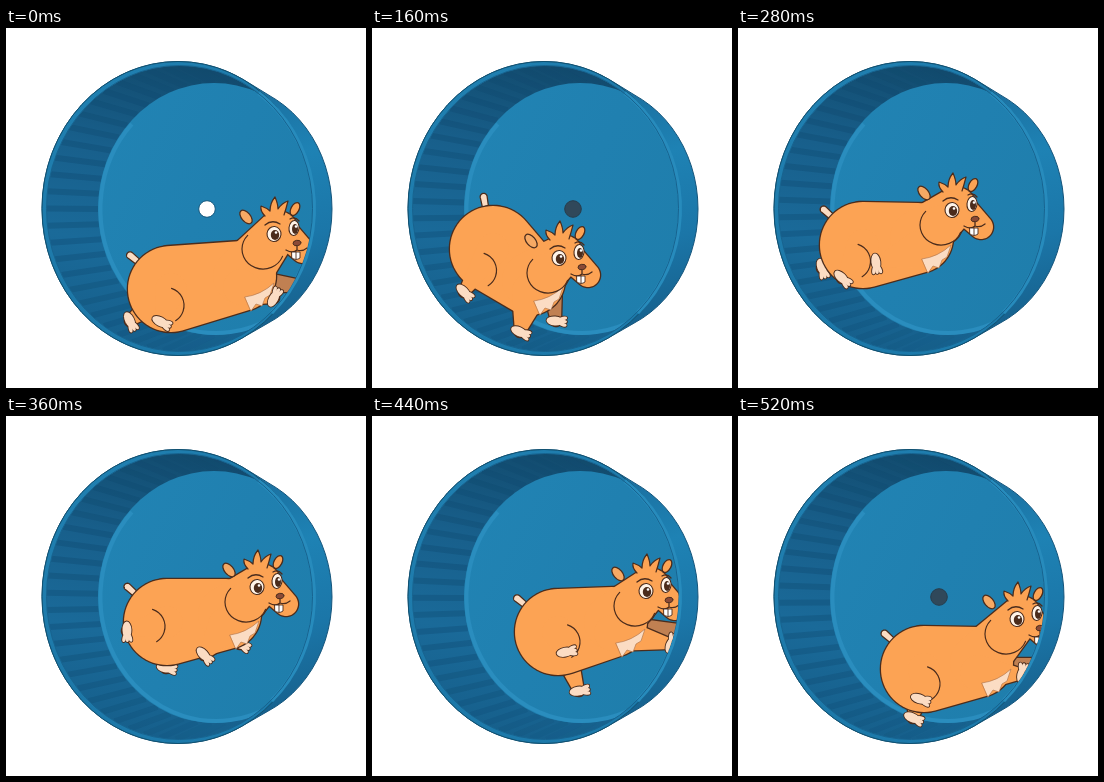
Write an HTML page with a canvas that moves like this. It is 360 px wide and 360 px high and loops after 560 ms.

```html
<!DOCTYPE html>
<html lang="en">
<head>
<meta charset="utf-8">
<title>Hamster wheel</title>
<style>
html, body { margin: 0; width: 100%; height: 100%; overflow: hidden; background: #fff; }
canvas { display: block; width: 360px; height: 360px; }
</style>
</head>
<body>
<canvas id="stage" width="360" height="360"></canvas>
<script>
const ctx = document.getElementById('stage').getContext('2d');
const STEP = 40, STEPS = 14, TAU = Math.PI * 2;
const FUR = '#fca354', CREAM = '#fbdcc3', INK = '#4b2c1c', SHADE = '#c08052';
const HIP_R = 43, CHEST_R = 35;

// Joints of the gallop; all other parts hang on these.
const gait = [
  { at: 0, hip: [165, 261], chest: [235, 248], head: [278, 203], fore: [268, 270], hind: [155, 294], hindFar: [124, 293] },
  { at: 2, hip: [140, 250], chest: [195, 256], head: [238, 218], fore: [200, 311], hind: [105, 280], hindFar: [132, 262] },
  { at: 4, hip: [121, 221], chest: [158, 252], head: [197, 227], fore: [148, 304], hind: [92, 264], hindFar: [108, 250] },
  { at: 7, hip: [125, 217], chest: [180, 210], head: [224, 179], fore: [138, 235], hind: [104, 250], hindFar: [84, 240] },
  { at: 9, hip: [161, 206], chest: [220, 198], head: [261, 168], fore: [198, 239], hind: [121, 215], hindFar: [160, 252] },
  { at: 11, hip: [186, 216], chest: [240, 206], head: [284, 172], fore: [299, 228], hind: [194, 236], hindFar: [207, 275] },
  { at: 13, hip: [186, 253], chest: [240, 246], head: [289, 200], fore: [284, 258], hind: [182, 283], hindFar: [175, 302] }
];

function poseAt(step) {
  const i = gait.findLastIndex(p => p.at <= step);
  const a = gait[i], b = gait[(i + 1) % gait.length];
  const u = (step - a.at) / ((b.at || STEPS) - a.at), pose = {};
  for (const k in a) if (k !== 'at') pose[k] = a[k].map((v, j) => v + (b[k][j] - v) * u);
  return pose;
}

const add = ([x, y], dx, dy) => [x + dx, y + dy];
const heading = (a, b) => Math.atan2(b[1] - a[1], b[0] - a[0]);

function oval(x, y, rx, ry = rx, turn = 0, from = 0, to = TAU) {
  const path = new Path2D();
  path.ellipse(x, y, rx, ry, turn, from, to);
  return path;
}

// Convex outline around ellipses given as [x, y, rx, ry].
function hull(...ovals) {
  const pts = ovals.flatMap(([x, y, rx, ry = rx]) => Array.from({ length: 72 }, (_, i) =>
    [x + rx * Math.cos(i * TAU / 72), y + ry * Math.sin(i * TAU / 72)]));
  pts.sort((a, b) => a[0] - b[0] || a[1] - b[1]);
  const side = list => {
    const out = [];
    for (const p of list) {
      for (let n = out.length; n > 1; n--) {
        const a = out[n - 2], b = out[n - 1];
        if ((b[0] - a[0]) * (p[1] - a[1]) - (b[1] - a[1]) * (p[0] - a[0]) > 0) break;
        out.pop();
      }
      out.push(p);
    }
    return out;
  };
  const path = new Path2D();
  for (const p of [...side(pts), ...side(pts.reverse())]) path.lineTo(...p);
  path.closePath();
  return path;
}

function paint(path, fill, line, width = 1.3) {
  if (fill) { ctx.fillStyle = fill; ctx.fill(path); }
  if (line) { ctx.strokeStyle = line; ctx.lineWidth = width; ctx.stroke(path); }
}

// Several shapes with one common outline.
function merge(paths, fill) {
  for (const p of paths) paint(p, null, INK, 2.6);
  for (const p of paths) paint(p, fill);
}

function place([x, y], turn, drawing) {
  ctx.save();
  ctx.translate(x, y);
  ctx.rotate(turn);
  drawing();
  ctx.restore();
}

function gradient(x0, y0, x1, y1, ...colors) {
  const g = ctx.createLinearGradient(x0, y0, x1, y1);
  colors.forEach((c, i) => g.addColorStop(i / (colors.length - 1), c));
  return g;
}

const front = [172, 180.5, 136, 147], back = [215, 181, 111, 126], floor = [208, 181, 116, 126];
const shell = hull(front, back), rim = oval(...front), plate = oval(...floor);
const lip = [173.5, 180.5, 133, 143], mouth = oval(...lip);

function wheel(step) {
  paint(shell, gradient(250, 50, 320, 290, '#1a6c9c', '#1e82b4', '#1b76a8', '#165f8b'), '#14547b', 1);
  paint(rim, gradient(60, 60, 260, 310, '#2080b1', '#1d78a8', '#1c7aab'), '#11506f', 1);
  ctx.save();
  ctx.clip(mouth);
  paint(mouth, gradient(190, 40, 130, 320, '#124b6e', '#185f8b', '#1a6a99', '#165f8b'));
  ctx.lineWidth = 6;
  for (let i = 0; i < 52; i++) {
    const a = (i + step * 5 / STEPS) * TAU / 52, c = Math.cos(a), s = Math.sin(a);
    ctx.strokeStyle = `rgba(10,62,98,${Math.max(0, 0.06 - c * 0.2)})`;
    ctx.beginPath();
    ctx.moveTo(lip[0] + lip[2] * c, lip[1] + lip[3] * s);
    ctx.lineTo(floor[0] + floor[2] * c, floor[1] + floor[3] * s);
    ctx.stroke();
  }
  paint(plate, gradient(95, 120, 305, 230, '#2183b3', '#2080b0', '#1f7eac'));
  paint(oval(210, 181, 115.5, 124, 0, TAU * 0.17, TAU * 0.62), null, '#2a8dbe', 4);
  ctx.restore();
  paint(oval(...lip.slice(0, 2), 134.5, 143, 0, -TAU * 0.15, TAU * 0.13), null, '#278bbc', 4);
  paint(mouth, null, '#17638f', 1);
  paint(oval(201, 181, 8.3), step ? '#30485a' : '#fff', step ? '#273c4b' : '#14567c', 1);
}

function paw(root, at) {
  place(at, heading(root, at) - TAU * 0.22, () => {
    const toes = [-3, 0, 3].map(y => oval(7, y, 4, 1.8, y * 0.08));
    const shapes = [oval(-1, 0, 8.5, 4.5), ...toes];
    for (const s of shapes) paint(s, null, INK, 1.8);
    for (const s of shapes) paint(s, CREAM);
  });
}

const limb = (root, at, thick) => hull([...root, thick], [...at, 5]);

function tail({ hip, chest }) {
  place(hip, heading(hip, chest) * 0.8 - TAU * 0.367, () =>
    paint(hull([41, 0, 3], [53, 0, 3.5]), CREAM, INK));
}

function face() {
  paint(oval(-21, 18, 21, 20, 0, TAU * 0.06, TAU * 0.62), null, INK, 1.2);
  paint(oval(-38, -14, 4.5, 8, -0.7), '#f6a964', INK);
  paint(new Path2D('M-19-15Q-24-20-23-25Q-17-23-14-20Q-14-28-9-34Q-6-27-6-22Q-2-28 4-30Q2-22 0-16'), FUR, INK, 1.2);
  for (const side of [-1, 1]) {
    const x = side * 10, y = -side * 3, rx = 6 - side;
    paint(oval(x, y, rx, 7.5, 0.1), '#fff4e9', INK, 1.1);
    paint(oval(x + 1, y + 1, rx * 0.6, 5), INK);
    paint(oval(x + 2, y - 1.5, 1.3), '#fff');
  }
  paint(new Path2D('M-19-6Q-12-12-4-7M6-12Q11-15 15-10M13 14V19M2 19Q9 23 13 19Q18 21 23 17'), null, INK, 1.3);
  paint(new Path2D('M8 21h8v6q-4 3-8 0zM12 21v7'), '#fff', INK, 0.9);
  paint(oval(13, 12, 4, 2.7, -0.2), '#8a4a36', INK, 1);
}

function hamster(p) {
  const { hip, chest, head, fore, hind, hindFar } = p;
  const foreFar = add(fore, 36, -11), skull = [...add(head, -6, 0), 20];
  const arm = add(chest, 0, 11), armFar = add(chest, 22, 6);
  ctx.save();
  ctx.clip(mouth);
  ctx.lineJoin = ctx.lineCap = 'round';
  tail(p);
  merge([limb(armFar, foreFar, 10)], SHADE);
  paw(armFar, foreFar);
  merge([limb(hip, hindFar, 16)], FUR);
  paw(hip, hindFar);
  place(add(head, 11, -22), 0.5, () => paint(oval(0, 0, 4, 7), FUR, INK));
  merge([
    hull([...hip, HIP_R], [...chest, CHEST_R]),
    hull([...chest, 28], skull),
    limb(arm, fore, 18),
    limb(hip, hind, 16),
    oval(...add(head, -21, 18), 21, 20),
    hull([...add(head, 1, 2), 14], [...add(head, 19, 20), 12])
  ], FUR);
  place(chest, 0, () =>
    paint(new Path2D('M4 21Q20 19 33 7L29 19L24 22L21 30L15 28L10 35Z'), CREAM, '#a96f48', 0.6));
  const knee = hip.map((v, i) => (v + hind[i]) / 2);
  paint(oval(...knee, 18, 18, 0, -TAU * 0.2, TAU * 0.16), null, INK, 1.2);
  paw(hip, hind);
  paw(arm, fore);
  place(head, 0, face);
  ctx.restore();
}

const start = performance.now();
function draw(now) {
  const step = Math.floor(Math.max(0, now - start) / STEP) % STEPS;
  ctx.clearRect(0, 0, 360, 360);
  wheel(step);
  hamster(poseAt(step));
  requestAnimationFrame(draw);
}
draw(start);
</script>
</body>
</html>
```
